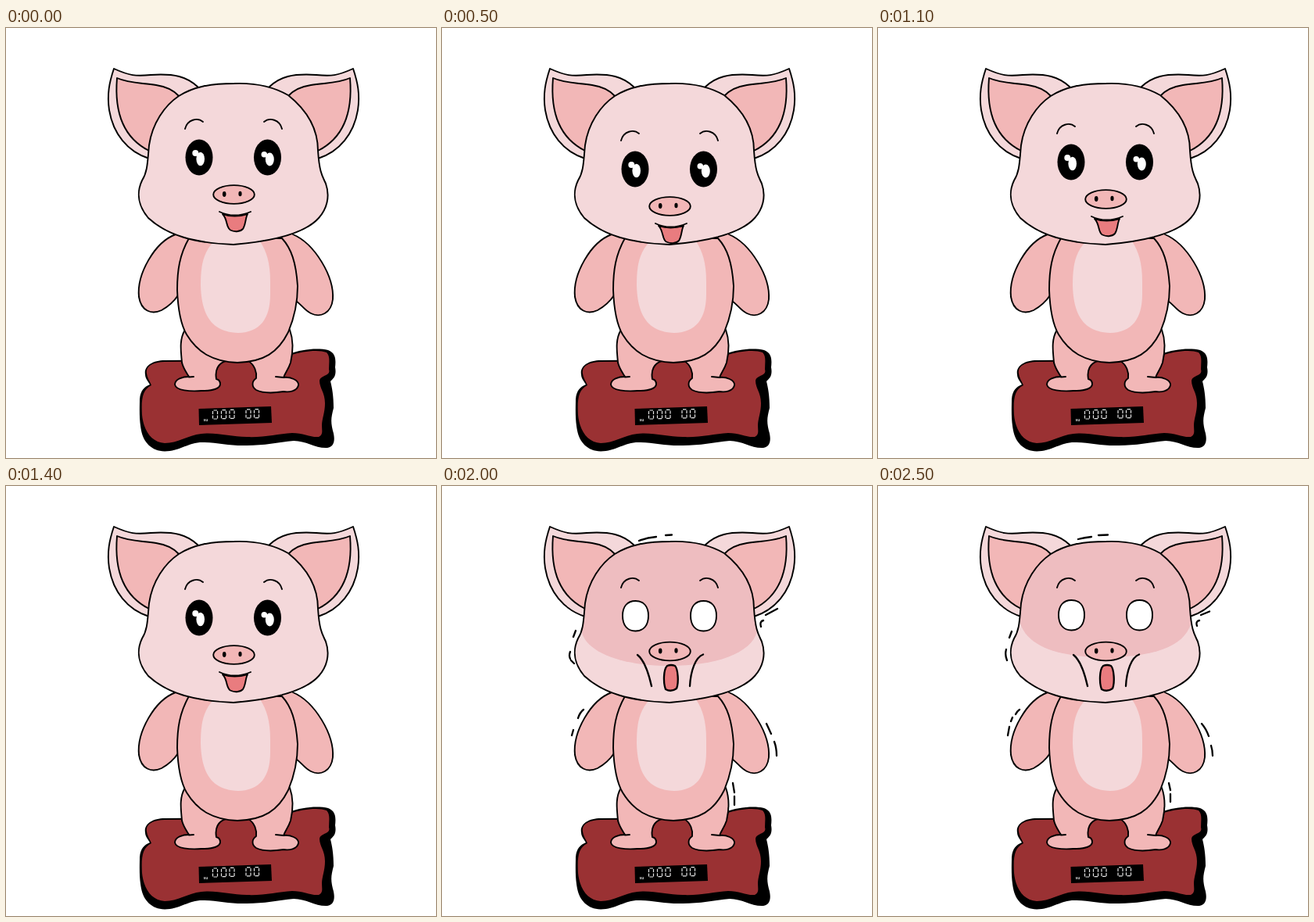
Write an HTML page that moves like this. It is 550 by 550 pixels and loops after 2600 ms.

```html
<!DOCTYPE html>
<html lang="en">
<head>
<meta charset="utf-8">
<title>Pig on a scale</title>
<style>
  html, body { margin: 0; width: 100%; height: 100%; overflow: hidden; background: #fff; }
  svg { display: block; width: 100vw; height: 100vh; }
  .line { stroke: #000; stroke-width: 1.9; stroke-linecap: round; stroke-linejoin: round; fill: none; }
  .pale { fill: #f4d8da; }
  .pink { fill: #f2b7b7; }
  .tongue { fill: #e97c7f; }
  .white { fill: #fff; }
  .thick { stroke-width: 2.3; }
</style>
</head>
<body>
<svg viewBox="0 0 550 550">
  <defs>
    <path id="head" d="M292 71C318 70 340 74 361 86C386 106 399 130 399 157C401 186 405 190 409 199C415 216 410 232 400 243C384 261 350 272 291 277C240 275 206 265 182 243C170 229 166 212 174 195C181 184 181 172 183 150C187 122 203 99 221 87C240 75 262 71 292 71Z"/>
    <clipPath id="headClip"><use href="#head"/></clipPath>
    <g id="ear" class="line">
      <path class="pale" d="M138 52C158 61 166 62 185 60C215 58 232 62 246 76L221 100L183 167C155 158 137 135 132 105C129 85 132 70 138 52Z"/>
      <path class="pink" d="M142 64C158 71 174 70 192 73C205 75 214 79 221 87L183 157C145 138 139 100 142 64Z"/>
    </g>
    <path id="brow" class="line" d="M229 129C232 117 245 114 252 120"/>
    <g id="snout">
      <ellipse class="line pink" cx="291.5" cy="213" rx="26.3" ry="11.9"/>
      <ellipse cx="279.2" cy="212.5" rx="2.3" ry="3.4"/>
      <ellipse cx="299.5" cy="212" rx="2.1" ry="3.2"/>
    </g>
  </defs>

  <!-- scale -->
  <path d="M178 443C176 433 187 425 203 425L290 424L362 417C378 411 398 409 412 412C422 416 422 424 421 434C423 445 419 448 415 452C417 460 419 470 419 486C416 498 415 503 418 515C422 528 419 536 411 537C396 538 384 528 368 528C348 530 330 534 308 534C286 535 268 529 248 530C230 532 222 541 203 541.500C186 541 176 530 173 515C170 500 171 485 171 475C172 463 177 459 184 456C181 451 178 448 178 443Z"/>
  <path fill="#9a3133" d="M180 442C178 433 188 427 203 427L290 426L362 419C380 413 400 411 410 415C415 420 413 428 413 437C416 445 402 444 401 451C401 461 408 466 408 480C408 492 404 500 404 508C404 515 406 520 400 523C390 524 380 518 366 518C348 519 330 524 308 523C288 523 270 517 250 519C232 521 220 531 203 531C186 530 176 515 174 495C173 475 174 463 186 457C183 450 181 448 180 442Z"/>
  <path d="M246.500 487L339 484L340 505L247 508Z"/>
  <g id="digits" stroke="#e4e4e4" stroke-width="1.200" fill="none"></g>
  <text x="252.500" y="503" font-family="'Liberation Sans', sans-serif" font-size="5" font-weight="bold" fill="#ddd">su</text>

  <!-- legs, arms, body -->
  <g class="line">
    <path class="pink" d="M229 386C221 399 224 415 225 428C227 436 231 441 234 446C226 446 216 449 216 456C217 464 236 465 250 464C265 464 273 461 274 456C274 451 272 450 269 449C267 438 271 429 281 426L296 410Z"/>
    <path d="M234 446.500L240 446"/>
    <path class="pink" d="M363 386C368 400 367 415 364 428C361 437 357 441 355 447C363 446 375 450 374 457C372 465 362 466 355 465C342 467 328 467 320 463C314 459 314 452 320 448C321 440 318 431 310 426L300 410Z"/>
    <path d="M345 446L355 447"/>
    <path class="pink" d="M217 264C190 274 167 315 170 344C173 362 186 367 199 361C208 356 214 351 220 342L240 280V262"/>
    <path class="pink" d="M367 264C395 276 420 318 418 347C416 365 402 371 390 365C382 361 378 354 372 350L345 280V262"/>
    <path class="pink" d="M234 269C222 290 219 310 219 335C220 362 224 380 231 392C245 415 265 427 296 428C330 427 348 415 361 389C369 370 373 350 373 330C371 300 365 282 353 269Z"/>
  </g>
  <path class="pale" d="M266 273C252 287 249 305 249 329C250 370 265 389 297 390C325 389 338 372 338 340V325C338 300 333 285 325 273Z"/>

  <!-- head -->
  <use href="#ear"/>
  <use href="#ear" transform="matrix(-1 0 0 1 582 0)"/>
  <use href="#head" class="pale"/>
  <path id="shade" fill="#eebdc0" clip-path="url(#headClip)"/>
  <use href="#head" class="line"/>

  <g id="happy">
    <use href="#brow"/>
    <use href="#brow" transform="matrix(-1 0 0 1 582 0)"/>
    <ellipse cx="247" cy="165.500" rx="17.500" ry="23"/>
    <ellipse cx="334.500" cy="165.500" rx="17.500" ry="23"/>
    <g class="white">
      <circle cx="242.300" cy="160" r="4"/>
      <ellipse cx="248.700" cy="167.500" rx="5.300" ry="8.700"/>
      <circle cx="330.300" cy="161.700" r="3.800"/>
      <ellipse cx="337.300" cy="168" rx="5.500" ry="8.500"/>
    </g>
    <use href="#snout"/>
    <path class="line tongue" d="M277 238C284 245 281 255 287 258.500C292 261 299 261 303 257C307 251 306 243 309 238Q292 243 277 238Z"/>
    <path class="line" d="M273 235Q292 244 313 235"/>
  </g>

  <g id="shock">
    <use href="#brow" y="1"/>
    <use href="#brow" y="1" transform="matrix(-1 0 0 1 582 0)"/>
    <g id="blankEyes" class="line white">
      <path id="blank" d="M247.500 147C258 147 264 154 264 166C264 178 258 185.500 247.500 185.500C237 185.500 231 178 231 166C231 154 237 147 247.500 147Z"/>
      <use href="#blank" x="87"/>
    </g>
    <use href="#snout" y="-1.500"/>
    <path class="line thick" d="M250 216C259 223 264 238 268 256M334 215.500C324 219 318 237 317 256"/>
    <path class="line thick tongue" d="M288 230Q293 228 298 230C302 234 303 252 300 259Q293 264 286 260C283 252 283 235 288 230Z"/>
    <path id="marks" class="line thick"/>
  </g>
</svg>

<script>
const el = id => document.getElementById(id);

// seven-segment zeros, slightly tilted
el("digits").innerHTML = [264.5, 275.5, 286, 307, 317.5].map(x => {
  const y = 489 - (x - 264) * 0.025;
  return `<path d="M${x + 1} ${y}h4.500M${x} ${y + 1}v4M${x + 6} ${y + 1}v4M${x} ${y + 6.5}v4M${x + 6} ${y + 6.5}v4M${x + 1} ${y + 11}h4.500"/>`;
}).join("");

// two alternating poses of the trembling
const poses = [
  { eyes: 0,
    shade: "M160 60H420L403 186C396 214 350 230 291 230C232 230 187 214 179 188Z",
    marks: "M252 70Q262 66 274 65M286 63L294 62.500M414 165L429 157M411 172Q406 173 408 180M171 185L168 193M164 212Q162 217 164 221M165 223L169 227M181 286Q176 290 174 297M168 312L166 319M415 304L421 317M425 327Q428 335 428 345M372 380L374 392M374 397V408" },
  { eyes: -1,
    shade: "M160 60H420L400 176C392 206 350 219 291 219C232 219 192 206 182 176Z",
    marks: "M256 68Q264 66 273 65M282 63L294 62.500M413 165L424 160.500M411 172Q406 173 408 179M171 186L168 194M164 209Q162 216 165 223M181 286Q178 288 176 292M172 296L170 301M168 308L166 319M414 304Q420 311 423 320M426 332Q428 338 428 345M372 380L374 389M374 394V404" }
];

function lookDown(step) {
  if (step < 9) return 3 * Math.min(step, 5);
  return Math.max(3, 15 - 3 * (step - 8));
}

function draw(now) {
  const step = Math.floor(now % 2600 / 100);
  const shocked = step >= 18;
  el("happy").style.display = shocked ? "none" : "";
  el("shock").style.display = el("shade").style.display = shocked ? "" : "none";
  if (shocked) {
    const pose = poses[step % 2];
    el("shade").setAttribute("d", pose.shade);
    el("marks").setAttribute("d", pose.marks);
    el("blankEyes").setAttribute("transform", `translate(0 ${pose.eyes})`);
  } else {
    el("happy").setAttribute("transform", `translate(0 ${lookDown(step)})`);
  }
}

const start = performance.now();
function tick() {
  draw(performance.now() - start);
  requestAnimationFrame(tick);
}
tick();
</script>
</body>
</html>
```
